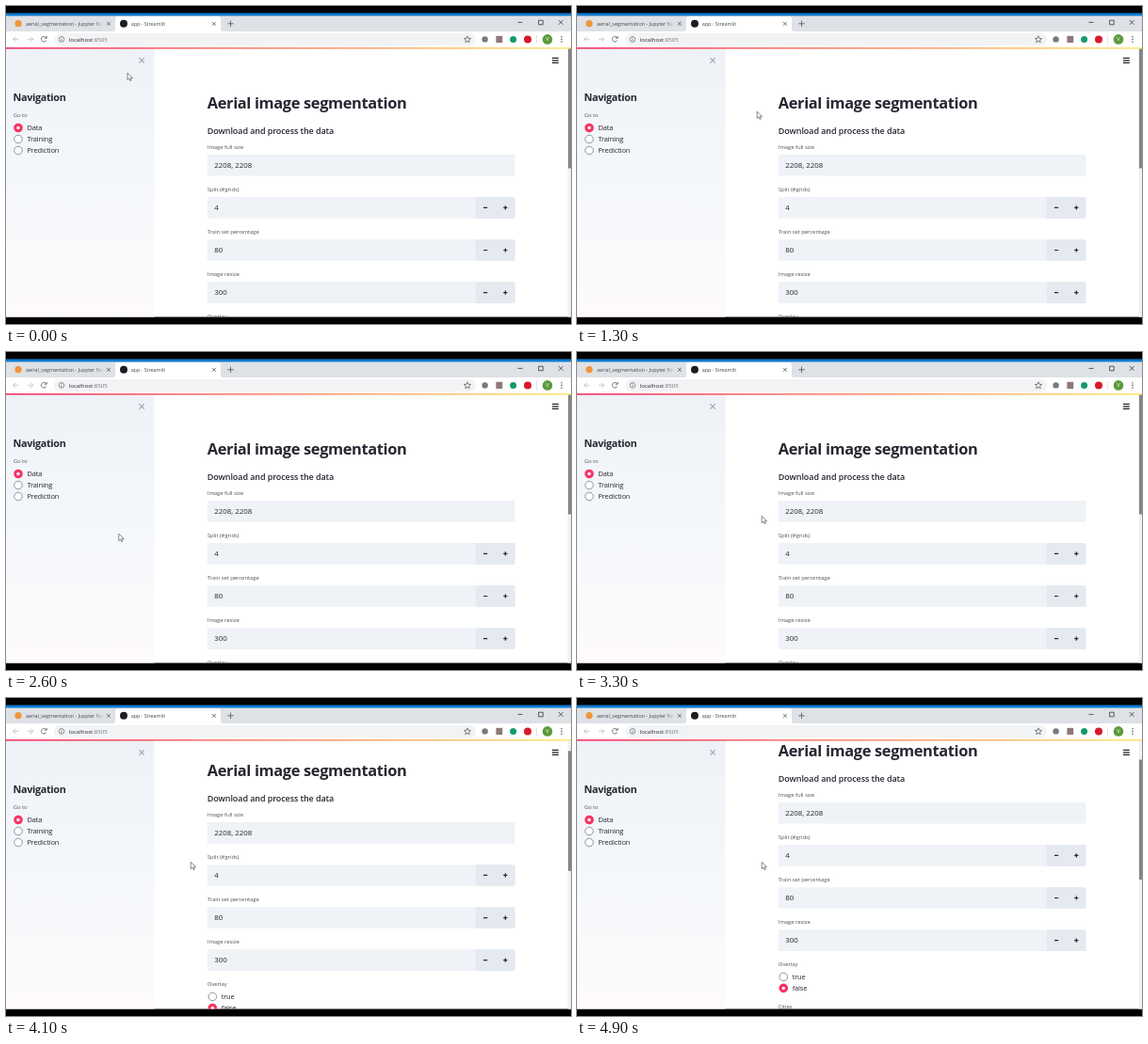
Recreate the animation shown at these times as an HTML page. Size 600 by 338 pixels, loop 5 s.

```html
<!DOCTYPE html>
<html lang="en">
<head>
<meta charset="utf-8">
<title>Aerial image segmentation</title>
<style>
html, body { margin: 0; width: 100%; height: 100%; overflow: hidden; background: #000; }
svg { display: block; width: 100vw; height: 100vh; }
text { font-family: "Open Sans", "Noto Sans", sans-serif; fill: #262730; }
.h1 { font-size: 16.4px; font-weight: 700; letter-spacing: -.0215em; }
.h3 { font-size: 9px; font-weight: 600; letter-spacing: -.01em; }
.nav { font-size: 10.8px; font-weight: 700; letter-spacing: -.03em; }
.label { font-size: 6px; letter-spacing: -.015em; fill: #52545e; }
.value { font-size: 7.9px; }
.option { font-size: 7.5px; letter-spacing: -.02em; }
.tab { font-size: 5.4px; fill: #45494d; }
.url { font-size: 6.1px; }
.line { fill: none; stroke: #5f6368; stroke-width: .9; }
.thin { fill: none; stroke: #222; stroke-width: .7; }
</style>
</head>
<body>
<svg viewBox="0 0 600 338" preserveAspectRatio="none">
  <defs>
    <linearGradient id="side" x1="0" y1="0" x2="0" y2="1">
      <stop offset="0" stop-color="#eef1f6"/>
      <stop offset=".5" stop-color="#f5f8fb"/>
      <stop offset="1" stop-color="#fefafd"/>
    </linearGradient>
    <linearGradient id="bar">
      <stop offset="0" stop-color="#f63366"/>
      <stop offset="1" stop-color="#fbe878"/>
    </linearGradient>
    <linearGradient id="fade">
      <stop offset="0" stop-color="#dee1e6" stop-opacity="0"/>
      <stop offset="1" stop-color="#dee1e6"/>
    </linearGradient>
    <clipPath id="view"><rect x="157" y="46" width="439" height="284.5"/></clipPath>
    <clipPath id="tabClip"><rect x="20" y="11" width="83" height="16"/></clipPath>
  </defs>

  <rect width="600" height="338"/>
  <rect y="7.5" width="600" height="4" fill="#0f7ad1"/>
  <rect y="10.5" width="600" height="17" fill="#dee1e6"/>
  <rect y="27" width="600" height="303.5" fill="#fff"/>

  <!-- tabs -->
  <circle cx="13" cy="18.7" r="3.6" fill="#f0953a"/>
  <g clip-path="url(#tabClip)"><text class="tab" x="21" y="20.7">aerial_segmentation - Jupyter Notebook</text></g>
  <rect x="94" y="13" width="10" height="12" fill="url(#fade)"/>
  <path class="line" d="M107 16.9l3.8 3.8m0-3.8l-3.8 3.8"/>
  <path d="M113 27.5q3 0 3-3V14q0-3 3-3h106q3 0 3 3v10.5q0 3 3 3z" fill="#fff"/>
  <circle cx="125" cy="18.8" r="4" fill="#1c1d20"/>
  <text class="tab" x="132.8" y="20.7">app · Streamlit</text>
  <path class="line" d="M219 16.9l3.8 3.8m0-3.8l-3.8 3.8M235.3 18.8h6.4m-3.2-3.2v6.4"/>
  <path class="thin" d="M543.5 17.4h5M565.6 15.2h4.6v4.6h-4.6zM586.8 15l4.8 4.8m0-4.8l-4.8 4.8"/>

  <!-- toolbar -->
  <rect x="51" y="29" width="448" height="13" rx="6.5" fill="#f1f3f4"/>
  <path class="line" style="stroke:#c0c3c6" d="M13.4 35.3H7.6m2.7-2.7l-2.7 2.7 2.7 2.7M23 35.3h5.8m-2.7-2.7l2.7 2.7-2.7 2.7"/>
  <path class="line" d="M42.6 33.7a2.8 2.8 0 1 0 .2 2.7M43.2 31.9v2.3h-2.3"/>
  <circle class="line" cx="59" cy="35.4" r="2.8" style="stroke-width:.7"/>
  <path class="line" style="stroke-width:.7" d="M59 35v2M59 33.7v.6"/>
  <text class="url" x="66.7" y="37.6">localhost<tspan fill="#71757a">:8505</tspan></text>
  <path class="line" style="stroke-width:.8" d="M490 31.9l1 2.4 2.6.2-2 1.7.6 2.5-2.2-1.4-2.2 1.4.6-2.5-2-1.7 2.6-.2z"/>
  <circle cx="508.6" cy="35.4" r="3.2" fill="#777b80"/>
  <rect x="520.4" y="31.8" width="6.8" height="7.2" fill="#8f7777"/>
  <circle cx="538.6" cy="35.4" r="3.5" fill="#149a6c"/>
  <circle cx="554" cy="35.4" r="4" fill="#d9192b"/>
  <path d="M563.5 31v9" stroke="#d5d8db" stroke-width=".7"/>
  <circle cx="575" cy="35.4" r="5.3" fill="#5c9a3c"/>
  <text x="575" y="37.4" text-anchor="middle" font-size="5.6" style="fill:#fff">V</text>
  <g fill="#5f6368"><circle cx="590" cy="32.7" r=".8"/><circle cx="590" cy="35.4" r=".8"/><circle cx="590" cy="38.1" r=".8"/></g>

  <!-- sidebar -->
  <rect y="45" width="157.5" height="285.5" fill="url(#side)"/>
  <path d="M141.4 55.2l5.4 5.4m0-5.4l-5.4 5.4" stroke="#a3a8b4" stroke-width="1.2"/>
  <text class="nav" x="7.6" y="101">Navigation</text>
  <text class="label" x="7.8" y="117.8">Go to</text>
  <g id="menu"></g>

  <!-- page -->
  <g clip-path="url(#view)"><g id="page">
    <text class="h1" x="213.8" y="108.8">Aerial image segmentation</text>
    <text class="h3" x="213.8" y="135.9">Download and process the data</text>
    <g id="form"></g>
  </g></g>
  <path d="M580 55.4h6.8M580 57.9h6.8M580 60.4h6.8" stroke="#262730" stroke-width="1.1"/>
  <rect x="596.5" y="45" width="3.5" height="285.5" fill="#f1f1f1"/>
  <rect id="thumb" x="597" y="45" width="3" height="127.5" fill="#858585"/>
  <rect y="44" width="600" height="1.6" fill="url(#bar)"/>

  <path id="cursor" d="M0 0v7.4l1.8-1.6 1.2 2.6 1.2-.6-1.2-2.4h2.4z" fill="#fff" stroke="#555" stroke-width=".7"/>
</svg>
<script>
const $ = id => document.getElementById(id);
const label = (y, s) => `<text class="label" x="213.8" y="${y}">${s}</text>`;

function radio(x, y, s, on) {
  const dot = on
    ? `<circle cx="${x}" cy="${y}" r="4.8" fill="#f63366"/><circle cx="${x}" cy="${y}" r="1.7" fill="#fff"/>`
    : `<circle cx="${x}" cy="${y}" r="4.3" fill="#fff" stroke="#8f939c" stroke-width="1"/>`;
  return dot + `<text class="option" x="${x + 9.4}" y="${y + 2.8}">${s}</text>`;
}

function field(i, name, value) {
  const y = 158 + 45.1 * i, m = y + 11.3;
  const steps = i ? `<path d="M498.7 ${y}h40.3q1.5 0 1.5 1.5v19.6q0 1.5-1.5 1.5h-40.3z" fill="#e5e9f0"/>
    <path d="M507 ${m}h4.2M528.2 ${m}h4.2m-2.1-2.1v4.2" stroke="#262730" stroke-width="1.2"/>` : "";
  return label(y - 6.3, name) +
    `<rect x="213.7" y="${y}" width="326.8" height="22.6" rx="1.5" fill="#eff2f6"/>${steps}
    <text class="value" x="221.3" y="${m + 2.8}">${value}</text>`;
}

$("menu").innerHTML = ["Data", "Training", "Prediction"]
  .map((s, i) => radio(13, 129.5 + 12 * i, s, !i)).join("");
$("form").innerHTML = [
  ["Image full size", "2208, 2208"], ["Split (#grids)", 4],
  ["Train set percentage", 80], ["Image resize", 300]
].map((f, i) => field(i, ...f)).join("") +
  label(331.7, "Overlay") + radio(219.3, 343.4, "true") +
  radio(219.3, 355.4, "false", true) + label(377.2, "Cities");

// pointer path: time, x, y
const path = [
  [0, 129, 71.2], [600, 163, 100], [1300, 191.2, 112], [1800, 112, 217],
  [2300, 100, 240], [2600, 119.8, 193.2], [3000, 168, 173], [3300, 196.2, 174.3], [5000, 196.2, 174.3]
];

function slope(i, k) {
  const a = path[i - 1], b = path[i + 1];
  return a && b && i < path.length - 2 ? (b[k] - a[k]) / (b[0] - a[0]) : 0;
}

function along(t, k) {
  let i = 0;
  while (t >= path[i + 1][0]) i++;
  const a = path[i], b = path[i + 1], d = b[0] - a[0], u = (t - a[0]) / d, v = 1 - u;
  return v * v * (1 + 2 * u) * a[k] + u * u * (3 - 2 * u) * b[k] +
    d * u * v * (v * slope(i, k) - u * slope(i + 1, k));
}

function draw(now) {
  const t = Math.floor(now % 5000 / 100) * 100;
  const u = Math.min(1, Math.max(0, (t - 3985) / 215));
  const ease = u * u * (3 - 2 * u);
  $("page").setAttribute("transform", `translate(0 ${-47 * ease})`);
  $("thumb").setAttribute("y", 45 + 20.5 * ease);
  $("cursor").setAttribute("transform", `translate(${along(t, 1)} ${along(t, 2)})`);
}

let start;
function tick(now) {
  start ??= now;
  draw(now - start);
  requestAnimationFrame(tick);
}
draw(0);
requestAnimationFrame(tick);
</script>
</body>
</html>
```
